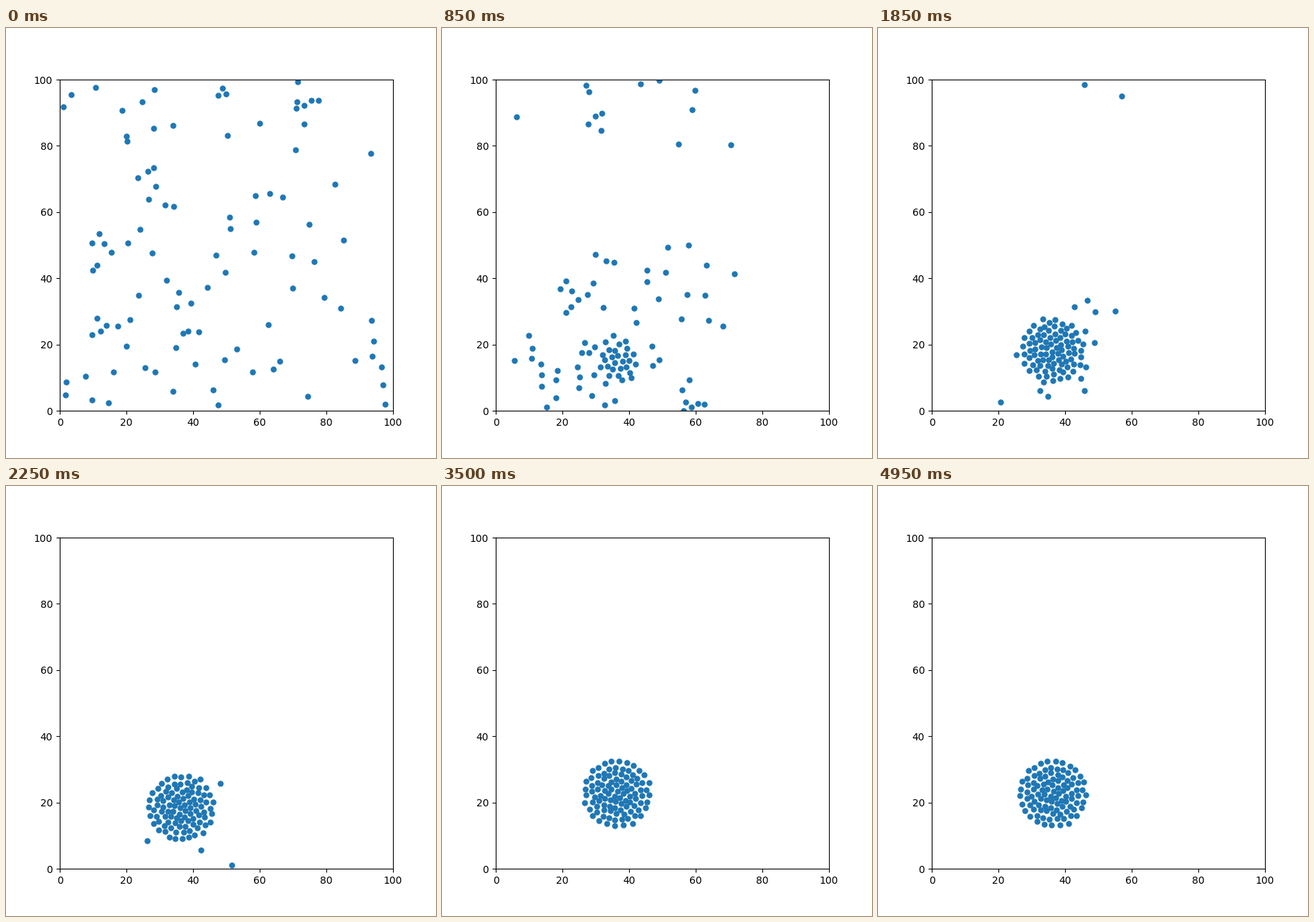
Write a matplotlib script that moves like this. It is 600x600 px and loops after 5 s.

```python
import numpy as np
import matplotlib.pyplot as plt
from matplotlib.animation import FuncAnimation

SIZE = 100          # side of the wrapping square
FRAMES = 100
SUBSTEPS = 4
MAX_SPEED = 1.0     # units per frame
GAIN = 2.0
REPULSION = 7.0

# Particles per 20-unit cell, top row first.
DENSITY = ["55480", "07132", "63631", "58233", "65635"]


def start():
    """Scatter particles at random inside each cell."""
    rng = np.random.default_rng(3)
    cell = SIZE / len(DENSITY)
    points = []
    for row, counts in enumerate(reversed(DENSITY)):
        for col, count in enumerate(counts):
            points.append(cell * (rng.random((int(count), 2)) + (col, row)))
    return np.concatenate(points)


def centre(step):
    """The swarm's centre rises as late particles arrive from above."""
    return np.array([36.3, np.interp(step, [17, 29, 45, 57], [15, 18, 18.5, 22.8])])


def wrap(d):
    """Shortest displacement on the torus."""
    return (d + SIZE / 2) % SIZE - SIZE / 2


def advance(pos, step):
    """Pull towards the centre, push off neighbours, with limited speed."""
    d = wrap(pos[None] - pos[:, None])
    dist = np.maximum(np.hypot(d[..., 0], d[..., 1]), 0.05)
    push = (d / dist[..., None] ** 3).sum(axis=1)
    v = GAIN * (wrap(centre(step) - pos) - REPULSION * push)
    speed = np.hypot(v[:, 0], v[:, 1])[:, None]
    v *= MAX_SPEED / np.maximum(speed, MAX_SPEED)
    return (pos + v / SUBSTEPS) % SIZE


def simulate():
    pos = start()
    track = [pos]
    for step in range(1, FRAMES):
        for _ in range(SUBSTEPS):
            pos = advance(pos, step)
        track.append(pos)
    return track


track = simulate()

fig, ax = plt.subplots(figsize=(6, 6), dpi=100)
ax.set_xlim(0, SIZE)
ax.set_ylim(0, SIZE)
dots = ax.scatter(*track[0].T, s=25)


def draw(i):
    dots.set_offsets(track[i])
    return dots,


anim = FuncAnimation(fig, draw, frames=FRAMES, interval=50, repeat=True, repeat_delay=0)
plt.show()
```
